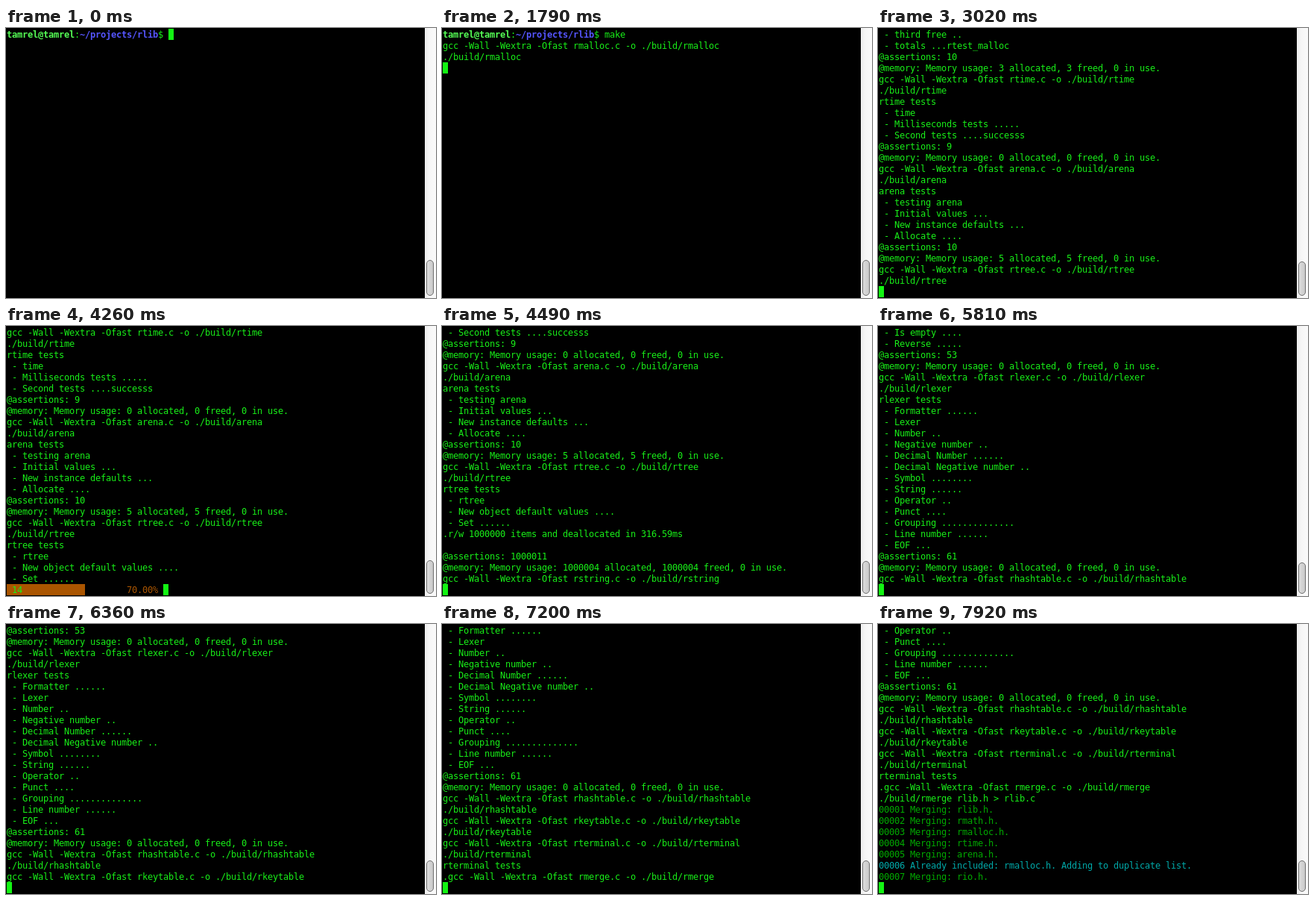
Recreate the animation shown at these times as an HTML page. Size 577 by 362 pixels, loop 8 s.

```html
<!DOCTYPE html>
<html lang="en">
<head>
<meta charset="utf-8">
<title>Terminal build</title>
<style>
  html, body { margin: 0; width: 100%; height: 100%; overflow: hidden; background: #000; }
  svg { display: block; }
  text { font: 12px "DejaVu Sans Mono", monospace; fill: #18f018; white-space: pre; }
  .user { fill: #55ff55; font-weight: bold; }
  .path { fill: #5555ff; font-weight: bold; }
  .dim { fill: #00aa00; }
  .cyan { fill: #00aaaa; }
  .orange { fill: #aa5500; }
</style>
</head>
<body>
<svg id="stage" width="577" height="362" viewBox="0 0 577 362">
  <defs>
    <linearGradient id="trough"><stop stop-color="#ececec"/><stop offset=".4" stop-color="#f6f6f6"/><stop offset="1" stop-color="#fafafa"/></linearGradient>
    <linearGradient id="grip"><stop stop-color="#dedede"/><stop offset="1" stop-color="#c8c8c8"/></linearGradient>
  </defs>
  <rect width="577" height="362"/>
  <rect x="562" width="15" height="362" fill="url(#trough)"/>
  <rect id="thumb" x="564.5" width="9" rx="4.5" fill="url(#grip)" stroke="#707070"/>
  <rect id="bar" x="1" y="346" height="15" fill="#aa5500"/>
  <rect id="cursor" width="7" height="15" fill="#13f513"/>
</svg>
<script>
const LOOP = 8000, ROWS = 24, CW = 7, LH = 15, LEFT = 1, TOP = 1;
const $ = id => document.getElementById(id);
const span = (cls, s) => `<tspan class="${cls}">${s}</tspan>`;

// log contents
const PROMPT = span('user', 'tamrel@tamrel') + ':' + span('path', '~/projects/rlib') + '$ ';
const PROMPT_COLS = 31;
const gcc = n => `gcc -Wall -Wextra -Ofast ${n}.c -o ./build/${n}`;
const build = n => [gcc(n), './build/' + n];
const test = (name, dots) => ` - ${name} ${'.'.repeat(dots)}`;
const tests = list => list.split('|').map(s => {
  const [name, dots = 0] = s.split(':');
  return test(name, +dots);
});
const summary = (checks, mem) => [
  '@assertions: ' + checks,
  `@memory: Memory usage: ${mem} allocated, ${mem} freed, 0 in use.`
];
const merge = (n, file) => span('dim', `0000${n} Merging: ${file}.h.`);

const log = [
  PROMPT + 'make',
  ...build('rmalloc'), 'rmalloc tests',
  ...tests('first malloc:1|second malloc:1|third malloc:1|first free:1|second free:1|third free:2'),
  test('totals', 3) + 'rtest_malloc',
  ...summary(10, 3),
  ...build('rtime'), 'rtime tests',
  ...tests('time|Milliseconds tests:5'),
  test('Second tests', 4) + 'successs',
  ...summary(9, 0),
  ...build('arena'), 'arena tests',
  ...tests('testing arena|Initial values:3|New instance defaults:3|Allocate:4'),
  ...summary(10, 5),
  ...build('rtree'), 'rtree tests',
  ...tests('rtree|New object default values:4|Set:6'),
  '.r/w 1000000 items and deallocated in 316.59ms', '',
  ...summary(1000011, 1000004),
  ...build('rstring'), 'rstring tests',
  ...tests('rstrip_whitespace:4|rstrtokline:18|Sorting string content:2|Format number to human readable:6|' +
    'Addslashes:1|Stripslashes:1|Starts with:6|Ends with:6|Is empty:4|Reverse:5'),
  ...summary(53, 0),
  ...build('rlexer'), 'rlexer tests',
  ...tests('Formatter:6|Lexer|Number:2|Negative number:2|Decimal Number:6|Decimal Negative number:2|' +
    'Symbol:8|String:6|Operator:2|Punct:4|Grouping:14|Line number:6|EOF:3'),
  ...summary(61, 0),
  ...build('rhashtable'), ...build('rkeytable'), ...build('rterminal'),
  'rterminal tests',
  '.' + gcc('rmerge'),
  './build/rmerge rlib.h &gt; rlib.c',
  ...['rlib', 'rmath', 'rmalloc', 'rtime', 'arena'].map((f, i) => merge(i + 1, f)),
  span('cyan', '00006 Already included: rmalloc.h. Adding to duplicate list.'),
  merge(7, 'rio')
];

// [time, finished lines]
const cues = [
  [0, 0], [1440, 1], [1540, 2], [1790, 3], [2040, 14], [2300, 22], [3020, 32],
  [3120, 36], [4490, 41], [4980, 42], [5080, 49], [5710, 57], [5810, 74],
  [6260, 75], [6360, 76], [6790, 77], [6890, 78], [7200, 81], [7720, 82],
  [7820, 85], [7920, 89]
];
const keys = [500, 610, 710, 860];

const cols = Array.from({ length: 80 }, (_, i) => LEFT + i * CW).join(' ');
const rows = Array.from({ length: ROWS }, (_, r) => {
  const el = document.createElementNS('http://www.w3.org/2000/svg', 'text');
  el.setAttribute('x', cols);
  el.setAttribute('y', TOP + r * LH + 12);
  $('stage').append(el);
  return el;
});
const shown = Array(ROWS).fill('');

function setRow(r, html) {
  if (shown[r] !== html) rows[r].innerHTML = shown[r] = html;
}

// steps of 5 %, faster towards the end
function progress(t) {
  return t < 4260 ? Math.floor((t - 3120) / 80 + 0.001)
    : t < 4280 ? 14 : Math.min(19, 15 + Math.floor((t - 4280) / 42));
}

// unfinished line at the cursor
function liveLine(t) {
  if (t < 1440) {
    const typed = keys.filter(k => t >= k).length;
    return { html: PROMPT + 'make'.slice(0, typed), col: PROMPT_COLS + typed };
  }
  if (t >= 3120 && t < 4490) {
    const k = progress(t), pct = (k * 5).toFixed(2) + '%';
    return {
      html: (' ' + k).padEnd(23) + span('orange', pct),
      col: 24 + pct.length, bar: k + 1
    };
  }
  if (t >= 5080 && t < 5710) {
    const html = test('Starts with', 3);
    return { html, col: html.length };
  }
  return { html: '', col: 0 };
}

function draw(t) {
  const count = cues.filter(c => t >= c[0]).pop()[1];
  const live = liveLine(t);
  const scroll = Math.max(0, count - ROWS + 1);
  for (let r = 0; r < ROWS; r++) {
    const i = scroll + r;
    setRow(r, i < count ? log[i] : i === count ? live.html : '');
  }
  $('cursor').setAttribute('x', LEFT + live.col * CW);
  $('cursor').setAttribute('y', TOP + (count - scroll) * LH);
  $('bar').setAttribute('width', (live.bar || 0) * CW);

  const h = Math.round(Math.max(42, 358 * ROWS / (179 + scroll)));
  $('thumb').setAttribute('y', 359.5 - h);
  $('thumb').setAttribute('height', h - 1);
}

const start = performance.now();
function tick() {
  draw((performance.now() - start) % LOOP);
  requestAnimationFrame(tick);
}
tick();
</script>
</body>
</html>
```
